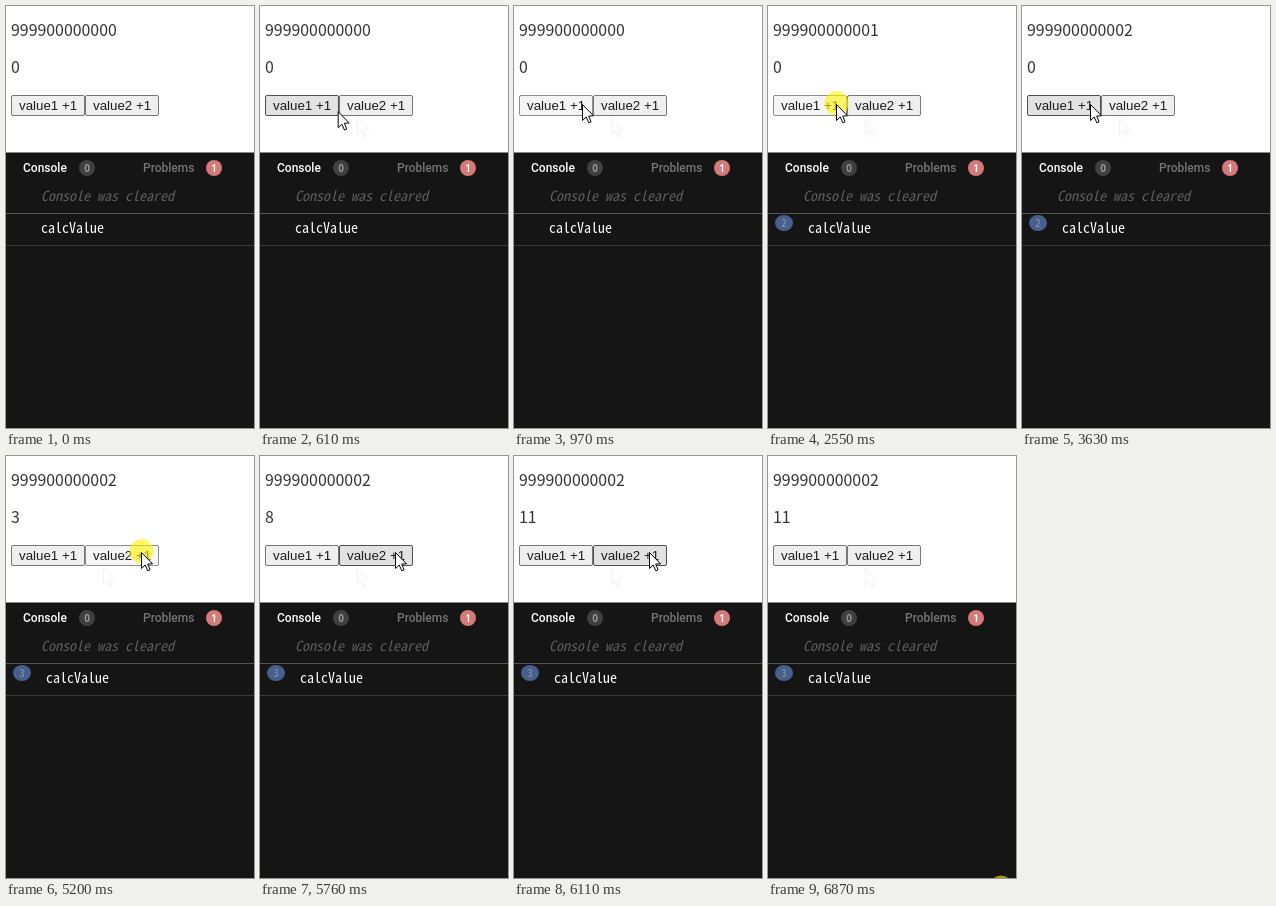
Animation of 248 by 422 pixels, one loop 6940 ms. Source, as an HTML page with a canvas:

```html
<!DOCTYPE html>
<html lang="en">
<head>
<meta charset="utf-8">
<title>Counter and console</title>
<style>
  html, body { margin: 0; width: 100%; height: 100%; overflow: hidden; background: #fff; }
  canvas { display: block; width: 248px; height: 422px; }
</style>
</head>
<body>
<canvas id="stage"></canvas>
<script>
const W = 248, H = 422, LOOP = 6940;
const STEP = 70;    // the pointer is redrawn at this interval
const HOLD = 65;    // how long a click is held down
const BUSY = 1070;  // value1 freezes the page while it is calculated
const SANS = '"Noto Sans CJK KR", "Noto Sans CJK JP", "Noto Sans", sans-serif';
const MONO = '"Noto Sans Mono CJK KR", "Noto Sans Mono CJK JP", "Noto Sans Mono", monospace';
const UI = '"Liberation Sans", Arial, sans-serif';
const TAB = 'Roboto, Inter, sans-serif';

const GLIDES = [
  { at: 260, steps: 6, from: [238, 128], to: [68, 98] },
  { at: 3630, steps: 5, from: [68, 98], to: [135, 94] },
  { at: 4720, steps: 2, from: [135, 94], to: [135, 96] },
  { at: 6180, steps: 4, from: [135, 96], to: [229, 404] },
  { at: 6460, steps: 2, from: [229, 404], to: [232.5, 432.5] }
];
const FIRST = { at: 820, count: 2, gap: 1730 };
const SECOND = [
  { at: 4320, count: 2, gap: 330 },
  { at: 5060, count: 9, gap: 118 }
];
const OUTSIDE = { at: 6870, count: 1, gap: STEP };
const CLICKS = [FIRST, ...SECOND, OUTSIDE];

const LOOKS = {
  idle: { fill: '#efefef', line: '#767676' },
  hover: { fill: '#e2e2e2', line: '#4f4f4f' },
  active: { fill: '#f5f5f5', line: '#8d8d8d' }
};

const canvas = document.getElementById('stage');
const ctx = canvas.getContext('2d');
const ratio = window.devicePixelRatio || 1;
canvas.width = W * ratio;
canvas.height = H * ratio;

const clamp = (v, lo, hi) => Math.min(hi, Math.max(lo, v));
const mix = (a, b, u) => a + (b - a) * u;

// Clicks of a burst that have taken effect after the given delay
const clicksDone = ({ at, count, gap }, t, delay) =>
  clamp(Math.floor((t - at - delay) / gap) + 1, 0, count);

const within = (burst, t, span) => clicksDone(burst, t, 0) > clicksDone(burst, t, span);
const isDown = t => CLICKS.some(burst => within(burst, t, HOLD));

// Curved glide: x leads, y trails
function pointerAt(t) {
  const glide = GLIDES.findLast(g => t >= g.at);
  if (!glide) return null;
  const { at, steps, from, to } = glide;
  const u = clamp(Math.floor((t - at) / STEP) / steps, 0, 1);
  return [
    mix(from[0], to[0], 1 - (1 - u) ** 1.6),
    mix(from[1], to[1], u ** 1.5)
  ];
}

function text(str, x, y, font, color, align = 'left') {
  ctx.font = font;
  ctx.fillStyle = color;
  ctx.textAlign = align;
  ctx.fillText(str, x, y);
}

function rect(x, y, w, h, color) {
  ctx.fillStyle = color;
  ctx.fillRect(x, y, w, h);
}

function ellipse(x, y, rx, ry, color) {
  ctx.beginPath();
  ctx.ellipse(x, y, rx, ry, 0, 0, Math.PI * 2);
  ctx.fillStyle = color;
  ctx.fill();
}

function button(x, label, tip, pressed) {
  const over = tip && tip[0] >= x && tip[0] < x + 74 && tip[1] >= 89 && tip[1] < 110;
  const look = LOOKS[over ? (pressed ? 'active' : 'hover') : 'idle'];
  ctx.beginPath();
  ctx.roundRect(x + 0.5, 89.5, 73, 20, 1.5);
  ctx.fillStyle = look.fill;
  ctx.fill();
  ctx.strokeStyle = look.line;
  ctx.lineWidth = 1;
  ctx.stroke();
  text(label, x + 8, 104, '13.333px ' + UI, '#1c1c1c');
}

function arrow(x, y, fill, line) {
  const shape = [[0, 0], [0, 16], [3.7, 12.5], [6.3, 18.3], [8.6, 17.3], [6.2, 11.6], [11, 11.3]];
  ctx.beginPath();
  for (const [dx, dy] of shape) ctx.lineTo(x + dx + 0.5, y + dy + 0.5);
  ctx.closePath();
  ctx.fillStyle = fill;
  ctx.fill();
  ctx.strokeStyle = line;
  ctx.lineWidth = 1;
  ctx.stroke();
}

function page(t, tip) {
  const value1 = 999900000000 + clicksDone(FIRST, t, BUSY);
  const value2 = SECOND.reduce((sum, burst) => sum + clicksDone(burst, t, HOLD), 0);
  const font = '300 15.9px ' + SANS;
  rect(0, 0, W, 147, '#fff');
  text(String(value1), 5, 30, font, '#333');
  text(String(value2), 5, 67, font, '#333');
  button(5, 'value1 +1', tip, within(FIRST, t, BUSY));
  button(79, 'value2 +1', tip, isDown(t));
  if (t >= 610) arrow(97, 112, '#fefefe', '#f1f1f1');
}

function tab(label, x, color, count, cx, fill, ink) {
  text(label, x, 166, '500 12px ' + TAB, color);
  ellipse(cx, 162, 8, 8, fill);
  text(count, cx, 165.5, '700 10px ' + TAB, ink, 'center');
}

function consolePanel(t) {
  rect(0, 147, W, H - 147, '#151515');
  rect(0, 146, W, 1, '#888');
  tab('Console', 17, '#fff', '0', 81, '#404040', '#999');
  tab('Problems', 137, '#757575', '1', 208, '#d77a77', '#fff');

  text('Console was cleared', 35, 195, 'italic 14px ' + MONO, '#5e5e5e');
  rect(0, 207, W, 1, '#555');
  rect(0, 239, W, 1, '#3a3a3a');

  const logs = 1 + clicksDone(FIRST, t, BUSY + STEP);
  if (logs > 1) {
    ellipse(16, 217, 9, 8, '#46608e');
    text(String(logs), 16, 221, '11px ' + MONO, '#8a96a8', 'center');
  }
  text('calcValue', logs > 1 ? 40 : 35, 227, '14px ' + MONO, '#fff');
}

function draw(t) {
  const tip = pointerAt(t);
  ctx.setTransform(ratio, 0, 0, ratio, 0, 0);
  page(t, tip);
  consolePanel(t);
  if (!tip) return;
  const [x, y] = tip;
  if (isDown(t)) ellipse(x + 0.5, y - 1, 12, 12, 'rgba(255,243,0,0.6)');
  arrow(x, y, '#fff', '#000');
}

const start = performance.now();
function tick() {
  draw((performance.now() - start) % LOOP);
  requestAnimationFrame(tick);
}
tick();
</script>
</body>
</html>
```
